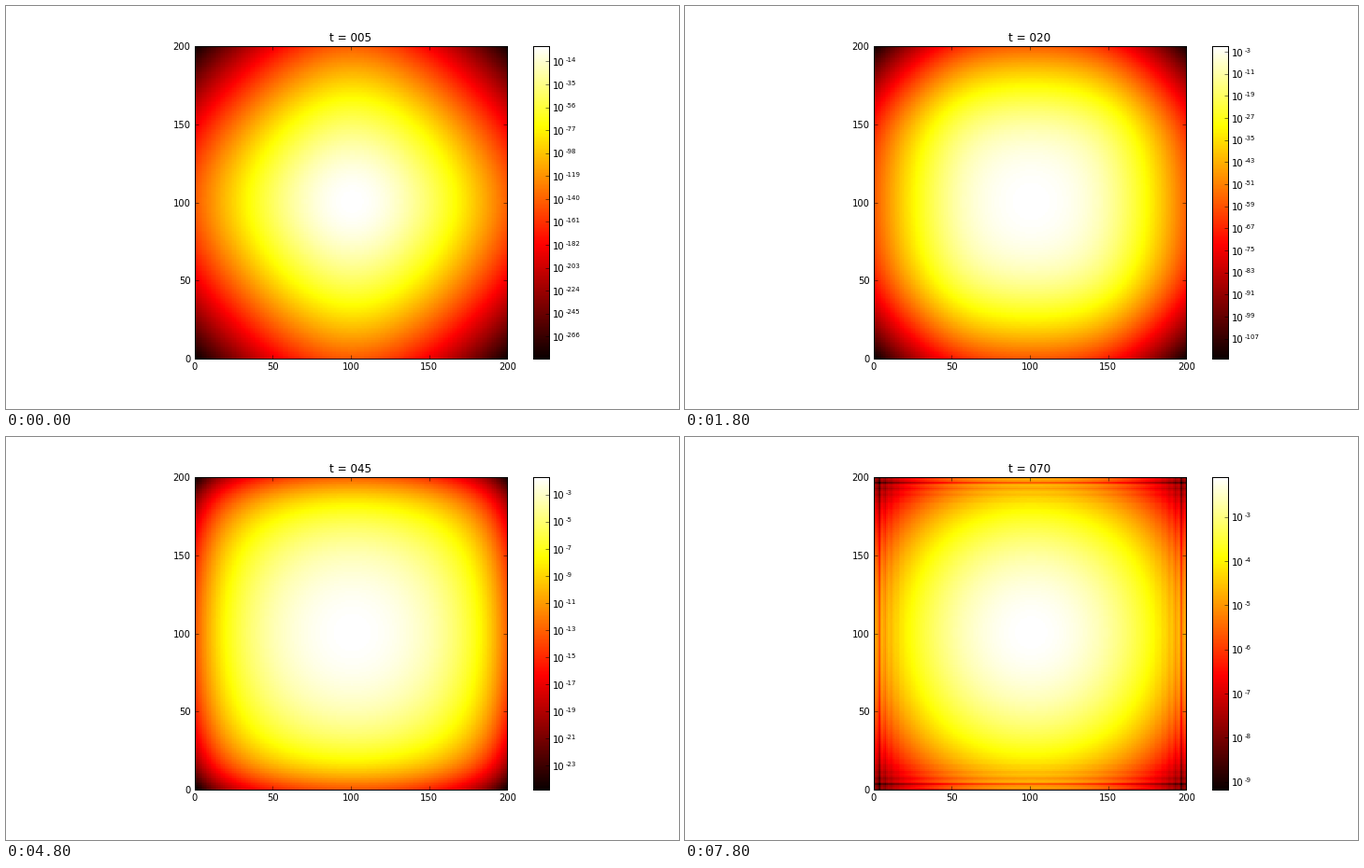
A matplotlib script that plays this animation: 720 px wide and 432 px high, repeating every 8000 ms.

```python
import matplotlib.pyplot as plt
import numpy as np
from matplotlib.animation import FuncAnimation

W, H, DPI = 720, 432, 72
N, CENTER, WIDTH = 200, 100, 5.0
STEP = 0.01                      # integration step
SHOWN = range(5, 71, 5)          # times on display
FRAMES, INTERVAL, HOLD = 40, 200, 3
MAX_TICKS = 15

plt.rcParams.update({
    "font.family": "DejaVu Sans",
    "font.size": 10,
    "axes.linewidth": 1.0,
})


def laplacian(p):
    """Second difference with zero walls just outside the grid."""
    out = -2 * p
    out[1:] += p[:-1]
    out[:-1] += p[1:]
    return out


def advance(p, duration):
    """Free quantum evolution, fourth-order Taylor steps."""
    for _ in range(round(duration / STEP)):
        term = p
        for order in range(1, 5):
            term = (1j * STEP / order) * laplacian(term)
            p = p + term
    return p


def log_densities():
    """log10 of the 2D density at each shown time (x and y separate)."""
    x = np.arange(N) - CENTER
    psi = np.exp(-(x / WIDTH) ** 2).astype(complex)
    fields, now = [], 0
    for t in SHOWN:
        psi = advance(psi, t - now)
        now = t
        line = 2 * np.log10(np.abs(psi))
        fields.append(line[:, None] + line[None, :])
    return fields


def decades(lo, hi):
    """Powers of ten to label, thinned out to fit the bar."""
    count = np.floor(hi) - np.ceil(lo)
    stride = 1
    while count / stride + 1 > MAX_TICKS:
        stride += 1
    powers = np.arange(np.floor(lo), np.ceil(hi) + stride, stride)
    return [int(p) for p in powers if lo <= p <= hi]


def add_axes(fig, left, top, width, height):
    return fig.add_axes([left / W, 1 - (top + height) / H, width / W, height / H])


fields = log_densities()

fig = plt.figure(figsize=(W / DPI, H / DPI), dpi=DPI, facecolor="white")
SIDE, TOP = 334.8, 43.2
BAR_LEFT, BAR_WIDTH = 564.3, SIDE / 20

ax = add_axes(fig, 201.6, TOP, SIDE, SIDE)
image = ax.imshow(fields[0], cmap="hot", origin="lower", aspect="auto",
                  interpolation="nearest", extent=(0, N, 0, N))
ax.set_xticks(range(0, N + 1, 50))
ax.set_yticks(range(0, N + 1, 50))
ax.tick_params(direction="in", length=4, width=0.5, pad=4, top=True, right=True)
title = ax.set_title("", fontsize=12, pad=5)

bar = add_axes(fig, BAR_LEFT, TOP, BAR_WIDTH, SIDE)
bar.imshow(np.linspace(0, 1, 256)[:, None], cmap="hot", origin="lower",
           aspect="auto", interpolation="nearest", extent=(0, 1, 0, 1))
bar.set_xticks([])
bar.yaxis.tick_right()
bar.tick_params(axis="y", direction="in", length=4, width=0.5, labelright=False)


def bar_text(size):
    return fig.text(0, 0, "", fontsize=size, ha="left", va="baseline")


labels = [(bar_text(10), bar_text(7)) for _ in range(MAX_TICKS + 1)]
LABEL_X = BAR_LEFT + BAR_WIDTH + 4


def place(text, x, y, string):
    text.set_position((x / W, 1 - y / H))
    text.set_text(string)


def draw(frame):
    i = frame // HOLD
    field = fields[i]
    lo, hi = field.min(), field.max()
    image.set_data(field)
    image.set_clim(lo, hi)
    title.set_text(f"t = {SHOWN[i]:03d}")

    powers = decades(lo, hi)
    spots = [(p - lo) / (hi - lo) for p in powers]
    bar.set_yticks(spots)
    bar.set_ylim(0, 1)
    for base, power in labels:
        base.set_text("")
        power.set_text("")
    for (base, power), p, s in zip(labels, powers, spots):
        y = TOP + SIDE * (1 - s)
        place(base, LABEL_X, y + 4.7, "10")
        place(power, LABEL_X + 13.2, y + 0.7, str(p))
    return [image, title]


anim = FuncAnimation(fig, draw, frames=FRAMES, interval=INTERVAL,
                     init_func=lambda: draw(0), repeat=True, repeat_delay=0,
                     blit=False)
plt.show()
```
